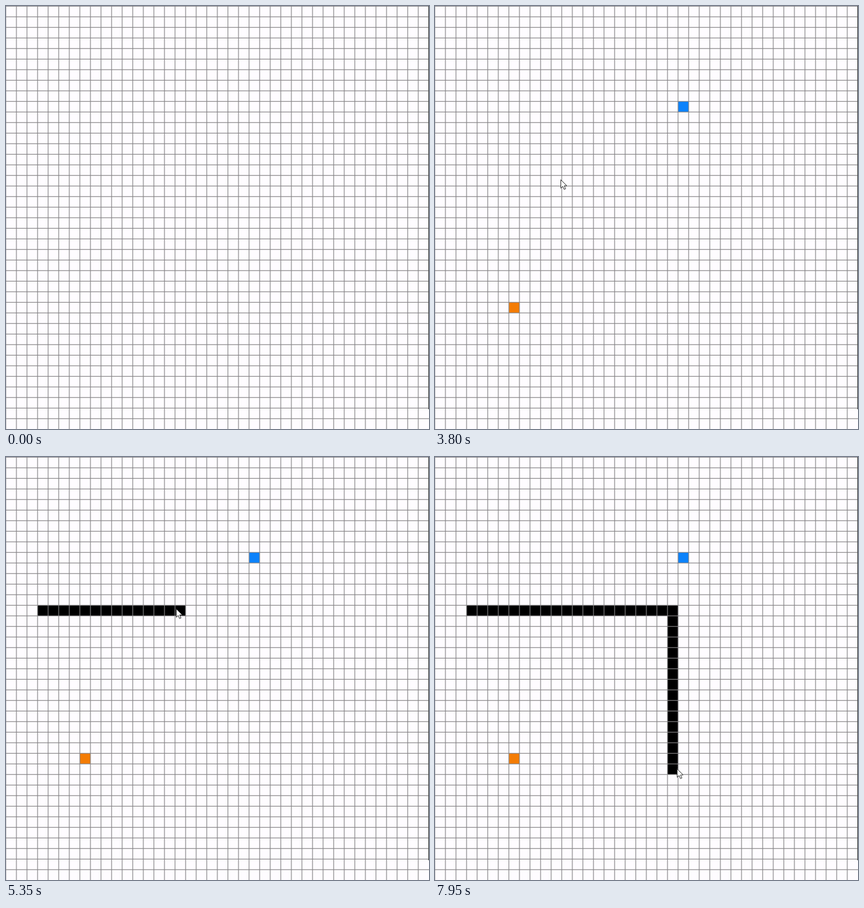
Write an HTML page with a canvas that moves like this. It is 600 px wide and 600 px high and loops after 8000 ms.

```html
<!DOCTYPE html>
<html lang="en">
<head>
<meta charset="utf-8">
<title>Grid drawing</title>
<style>
  html, body { margin: 0; width: 100%; height: 100%; overflow: hidden; background: #fefcff; }
  canvas { display: block; width: 600px; height: 600px; }
</style>
</head>
<body>
<canvas id="stage" width="600" height="600"></canvas>
<script>
const ctx = document.getElementById('stage').getContext('2d');
const SIZE = 600, CELL = 15, LOOP = 8000, STEP = 50;

// Where the pointer turns or changes pace
const stops = [
  { t: 1950, x: 115, y: 411 },
  { t: 2250, x: 114, y: 424 },
  { t: 2850, x: 341, y: 149 },
  { t: 3550, x: 346, y: 142 },
  { t: 3800, x: 178, y: 246 },
  { t: 4100, x: 38, y: 262 },
  { t: 4450, x: 46, y: 214 },
  { t: 5300, x: 233, y: 215 },
  { t: 5850, x: 320, y: 218 },
  { t: 6150, x: 332, y: 217 },
  { t: 6850, x: 340, y: 317 },
  { t: 7950, x: 343, y: 442 }
];
const SHOW = stops[0].t, START_AT = 2150, END_AT = 3550, WALL_AT = 4450;

const mix = (a, b, k) => a + (b - a) * k;

function pointer(t) {
  const next = Math.max(1, stops.findIndex(s => s.t >= t));
  const a = stops[next - 1], b = stops[next];
  const k = (t - a.t) / (b.t - a.t);
  return { x: mix(a.x, b.x, k), y: mix(a.y, b.y, k) };
}

function fillCell(col, row, color) {
  ctx.fillStyle = color;
  ctx.fillRect(col * CELL, row * CELL, CELL, CELL);
}

function drawGrid() {
  ctx.fillStyle = '#858486';
  for (let p = 0; p < SIZE; p += CELL) {
    ctx.fillRect(p - 0.7, 0, 1, SIZE);
    ctx.fillRect(0, p - 0.2, SIZE, 1);
  }
  ctx.fillStyle = '#4c4c4c';
  ctx.fillRect(SIZE - 1, 0, 1, 572);
}

const arrow = new Path2D('M.5 .5V12.3L3.2 9.8L5.2 14.2L7.2 13.3L5.3 9H9Z');

function drawPointer({ x, y }) {
  ctx.save();
  ctx.translate(Math.round(x), Math.round(y));
  ctx.fillStyle = '#fff';
  ctx.strokeStyle = '#333';
  ctx.lineWidth = 0.9;
  ctx.fill(arrow);
  ctx.stroke(arrow);
  ctx.restore();
}

function draw(t) {
  ctx.fillStyle = '#fefcff';
  ctx.fillRect(0, 0, SIZE, SIZE);
  if (t >= START_AT) fillCell(7, 28, '#f47c05');
  if (t >= END_AT) fillCell(23, 9, '#0c82fb');
  // Every cell the pointer has crossed since the drag began
  for (let s = WALL_AT; s <= t; s += STEP) {
    const { x, y } = pointer(s);
    fillCell(Math.floor(x / CELL), Math.floor(y / CELL), '#000');
  }
  drawGrid();
  if (t >= SHOW) drawPointer(pointer(t));
}

const begin = performance.now();
function tick() {
  const t = (performance.now() - begin) % LOOP;
  draw(Math.floor(t / STEP) * STEP);
  requestAnimationFrame(tick);
}
tick();
</script>
</body>
</html>
```
